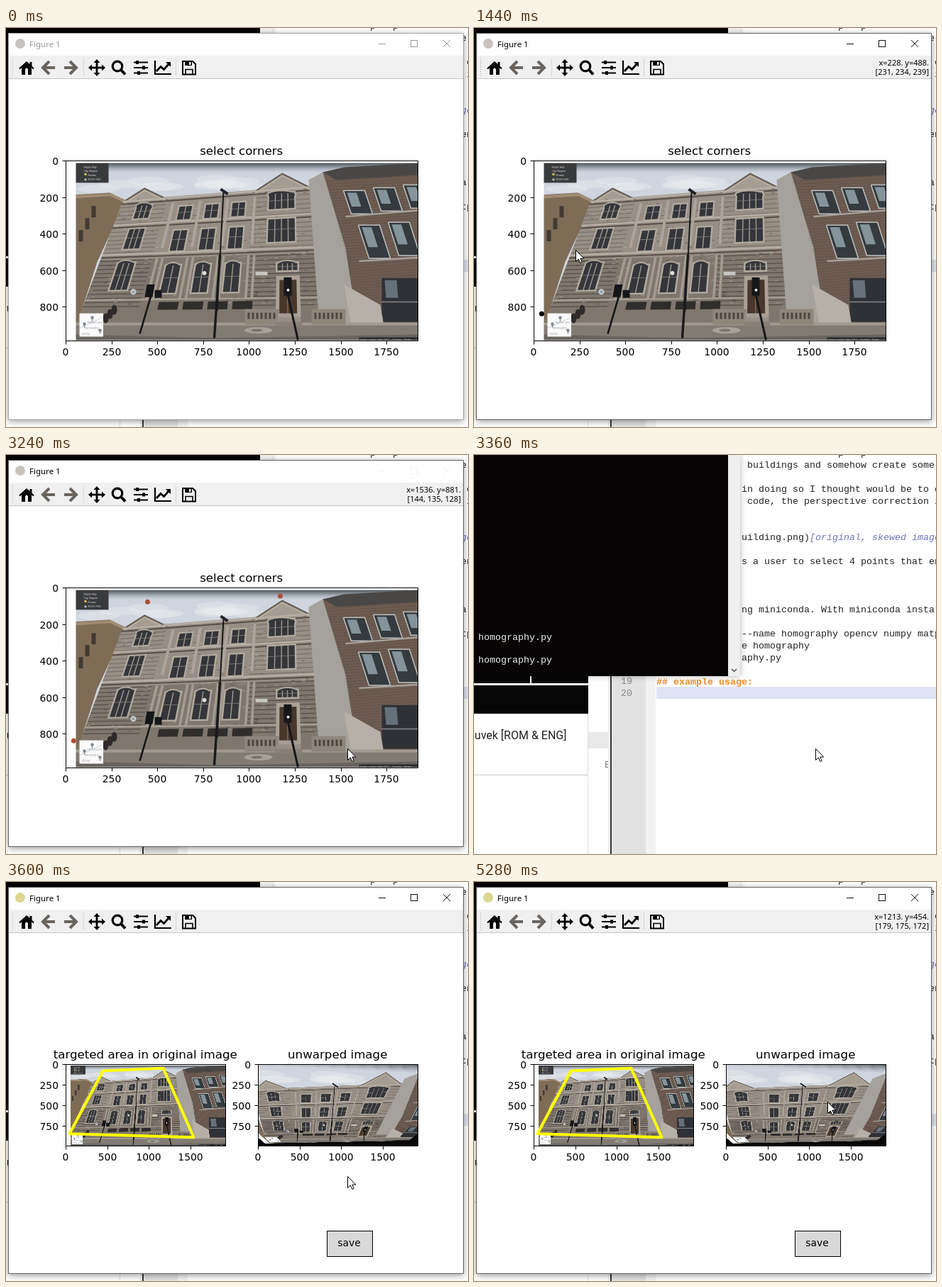
These frames come from a looping animation (651 by 563 pixels, 5.4 s). An HTML page with a canvas:

```html
<!DOCTYPE html>
<html lang="en">
<head>
<meta charset="utf-8">
<title>Perspective correction</title>
<style>
html, body { margin: 0; width: 100%; height: 100%; overflow: hidden; background: #fff; }
canvas { display: block; }
</style>
</head>
<body>
<canvas id="stage" width="651" height="563"></canvas>
<script>
const LOOP = 5400, STEP = 120;
const c = document.getElementById('stage').getContext('2d');
const PLOT = '"DejaVu Sans", sans-serif', UI = '"Noto Sans", sans-serif', MONO = '"Liberation Mono", monospace';
const IW = 1920, IH = 986;
const MAIN = { x: 84.5, y: 187.5, w: 496, h: 254 };
const LEFT = { x: 84.5, y: 257.5, w: 225, h: 115 };
const RIGHT = { ...LEFT, x: 355.5 };
const QUAD = [[445, 77], [1169, 45], [1536, 881], [42, 838]];
const at = (a, x, y) => [a.x + x / IW * a.w, a.y + y / IH * a.h];
const lerp = (a, b, f) => a + (b - a) * f;

// ---- helpers ----
function rect(col, x, y, w, h) { c.fillStyle = col; c.fillRect(x, y, w, h); }
function text(s, x, y, font, col = '#000', align = 'left') {
  c.font = font; c.fillStyle = col; c.textAlign = align; c.fillText(s, x, y);
}
function trace(pts, close) {
  c.beginPath();
  for (let i = 0; i < pts.length; i += 2) c.lineTo(pts[i], pts[i + 1]);
  if (close) c.closePath();
}
function line(col, w, ...pts) { trace(pts); c.strokeStyle = col; c.lineWidth = w; c.stroke(); }
function frameBox(x, y, w, h, col = '#000') { c.strokeStyle = col; c.lineWidth = 1; c.strokeRect(x, y, w, h); }
function disc(col, x, y, r) { c.beginPath(); c.arc(x, y, r, 0, 7); c.fillStyle = col; c.fill(); }
function ring(col, x, y, r, w) { c.beginPath(); c.arc(x, y, r, 0, 7); c.strokeStyle = col; c.lineWidth = w; c.stroke(); }

// Projective map taking the quad to its bounding box
function unwarp(q) {
  const [[x0, y0], [x1, y1], [x2, y2], [x3, y3]] = q;
  const sx = x0 - x1 + x2 - x3, sy = y0 - y1 + y2 - y3;
  const ax = x1 - x2, ay = y1 - y2, bx = x3 - x2, by = y3 - y2, den = ax * by - bx * ay;
  const g = (sx * by - sy * bx) / den, h = (ax * sy - ay * sx) / den;
  const a = x1 - x0 + g * x1, b = x3 - x0 + h * x3, d = y1 - y0 + g * y1, e = y3 - y0 + h * y3;
  const xs = q.map(p => p[0]), ys = q.map(p => p[1]);
  const l = Math.min(...xs), t = Math.min(...ys), r = Math.max(...xs), btm = Math.max(...ys);
  return (x, y) => {
    const k = (d * h - e * g) * x + (b * g - a * h) * y + a * e - b * d;
    const u = ((e - y0 * h) * x + (x0 * h - b) * y + b * y0 - x0 * e) / k;
    const v = ((y0 * g - d) * x + (a - x0 * g) * y + x0 * d - a * y0) / k;
    return [lerp(l, r, u), lerp(t, btm, v)];
  };
}

// Street view of flat shapes in stage coordinates; the facade uses its own u, v grid
function street(map, labels) {
  const cv = document.createElement('canvas');
  cv.width = 992; cv.height = 508;
  const g = cv.getContext('2d');
  const path = n => {
    g.beginPath();
    for (let i = 0; i < n.length; i += 2) {
      const [x, y] = map((n[i] - 84) / 496 * IW, (n[i + 1] - 187) / 255 * IH);
      g.lineTo(x * 992 / IW, y * 508 / IH);
    }
  };
  const poly = (col, ...n) => { path(n); g.fillStyle = col; g.fill(); };
  const seg = (col, w, ...n) => { path(n); g.strokeStyle = col; g.lineWidth = w * 2; g.stroke(); };
  const corners = (x, y, w, h, s = 0) => [x, y, x + w, y, x + w + s, y + h, x + s, y + h];
  const box = (col, ...b) => poly(col, ...corners(...b));
  const oval = (col, x, y, rx, ry = rx) => {
    const n = [];
    for (let a = 0; a < 6.28; a += .3) n.push(x + rx * Math.cos(a), y + ry * Math.sin(a));
    poly(col, ...n);
  };
  let seed = 7;
  const rnd = () => (seed = seed * 16807 % 2147483647) / 2147483647;

  g.fillStyle = '#080808'; g.fillRect(0, 0, 992, 508);
  path(corners(84, 187, 496, 255)); g.clip();
  box('#fff', 84, 187, 496, 255);

  // sky, darker at the top edge
  box('#cfd5de', 98, 190, 482, 251);
  for (let i = 0; i < 12; i++) oval('rgba(232,234,238,.4)', 130 + rnd() * 240, 212 + rnd() * 16, 30, 6);
  for (let i = 0; i < 14; i++) box(`rgba(60,70,74,${.8 * (1 - i / 14) ** 1.5})`, 98, 190 + i, 482, 1.1);

  // neighbour on the left
  poly('#7f6c56', 98, 235, 146, 232, 168, 243, 128, 330, 98, 424);
  seg('#a08c73', 4, 98, 238, 147, 235, 164, 243);
  for (let i = 0; i < 3; i++) box('#413a34', 102 + i * 9, 285 - i * 17, 6, 16);

  // facade
  const face = (u, v) => [lerp(164 - 66 * v, 430 + 11 * v, u), lerp(243 + 177 * v, 222 + 198 * v, u)];
  const quad = (u, v, w, h) => [...face(u, v), ...face(u + w, v), ...face(u + w, v + h), ...face(u, v + h)];
  const course = (col, w, v, u0 = 0, u1 = 1) => seg(col, w, ...face(u0, v), ...face(u1, v));
  const post = (col, w, u, v0, v1) => seg(col, w, ...face(u, v0), ...face(u, v1));
  const win = (u, v, w, h, cols, arch) => {
    poly('#b3aba0', ...quad(u - .008, v - .012, w + .016, h + .024));
    if (arch) oval('#b3aba0', ...face(u + w / 2, v + .01), w * 165, 7);
    poly('#34363a', ...quad(u, v, w, h));
    if (arch) oval('#34363a', ...face(u + w / 2, v + .01), w * 145, 5);
    for (let i = 1; i < cols; i++) post('#a29b92', 1.4, u + w * i / cols, v, v + h);
    course('#85817b', .8, v + h * .45, u, u + w);
  };
  const gable = (u0, u1, rise) => {
    const [x0, y0] = face(u0, .02), [x1, y1] = face(u1, .02), n = [x0, y0, (x0 + x1) / 2, (y0 + y1) / 2 - rise, x1, y1];
    poly('#a59d92', ...n); seg('#645b53', 2, ...n); seg('#c0b9ae', 1, ...n.map((q, i) => i % 2 ? q + 3 : q));
  };
  const TOWERS = [[0, .24], [.69, 1]];
  poly('#978f86', ...quad(0, 0, 1, 1));
  poly('#7f776e', ...quad(0, .48, 1, .52));
  for (const [a, b] of TOWERS) {
    gable(a, b, a ? 24 : 18);
    for (let v = .06; v < .86; v += .033) course(v > .47 ? 'rgba(45,39,34,.5)' : 'rgba(65,57,50,.35)', 1.2, v, a, b);
  }
  for (let i = 0; i < 260; i++) {
    const u = rnd(), v = rnd() * .86;
    course(i % 2 ? 'rgba(200,193,183,.5)' : 'rgba(50,44,39,.4)', 1, v, u, u + .015);
  }
  for (const v of [.01, .2, .44]) { course('#b8b0a5', 2.4, v); course('#544c45', 1.8, v + .022); }
  for (let i = 0; i < 4; i++) {
    const u = .264 + i * .142;
    post('#aca499', 4, u + .012, .05, .4);
    for (const d of [0, .026]) post('#a59c91', 3.5, u + d, .48, .8);
  }
  for (let r = 0; r < 3; r++) {
    const v = [.085, .27, .54][r], h = .1 + r * .055;
    win(.09, v - .03, .075, h, 3, r !== 1);
    for (let i = 0; i < 3; i++) win(.315 + i * .137, v, .065, h, 2, r === 2);
    if (r < 2) win(.777, v - .045, .13, h + .01, 4, !r);
  }
  course('#aaa297', 2, .8);
  for (let i = 0; i < 4; i++) poly('#302e2c', ...quad(.32 + i * .105, .82, .085, .06));
  win(.825, .55, .09, .05, 4, true);
  poly('#aba296', ...quad(.82, .64, .105, .3));
  poly('#49372c', ...quad(.835, .67, .075, .26));
  post('#856f5c', 1.2, .87, .67, .93);

  // pale wall, brick block with rows of glazing
  poly('#a5a19c', 426, 214, 446, 203, 478, 300, 492, 418, 441, 420);
  poly('#6d5c52', 446, 203, 580, 190, 580, 416, 494, 418, 478, 310);
  for (let y = 216; y < 410; y += 4) seg('rgba(40,32,28,.16)', 1, 450 + (y - 212) * .26, y, 580, y - 8);
  poly('#494745', 446, 203, 476, 196, 580, 190, 580, 207, 465, 214);
  for (let r = 0; r < 2; r++) {
    for (let i = 0; i < 3; i++) {
      const b = [475 + 21 * r + 42 * i, 229 + 49 * r - 4 * i, 30, 33 + 14 * r, 11 + 4 * r], [x, y, w, h, s] = b;
      box('#343a3d', ...b);
      box('#84949a', x + 5, y + 3, w * .45, h * .6, s * .6);
      seg('#bfc1c0', 1.5, ...corners(...b), x, y);
    }
    seg('#a6a19b', 2.5, 478 + r * 19, 266 + r * 63, 580, 257 + r * 67);
  }
  box('#2e3135', 529, 353, 51, 62);
  box('#66717a', 533, 356, 17, 25, 2);
  box('#888', 529, 386, 51, 1.5);
  poly('#b7b0a8', 476, 362, 527, 391, 532, 420, 486, 422);

  // pavement, balustrades, steps
  box('#817b74', 98, 416, 482, 25);
  box('#a19a91', 98, 416, 482, 4);
  poly('#68645f', 98, 433, 300, 438, 580, 433, 580, 441, 98, 441);
  for (const x of [336, 430]) {
    box('#8e867b', x, 397, 48, 22);
    for (let i = 0; i < 7; i++) box('#4c463f', x + 4 + i * 6, 402, 3, 9);
  }
  for (let i = 0; i < 3; i++) box(`rgb(${165 - i * 14},${157 - i * 14},${147 - i * 14})`, 383 - i * 2, 403 + i * 6, 30 + i * 4, 6);
  oval('#a6a19a', 355, 427, 20, 4.5); oval('#77726c', 353, 427, 8, 2);
  for (let i = 0; i < 3; i++) oval('#2f2b2a', 140 + i * 6, 410 - i * 6, 4, 7);

  // lamp post, signals, markers
  oval('#c9ccd0', 179, 372.5, 4); oval('#8fa0ae', 179, 372.5, 2); oval('#dedbd4', 279, 346, 3);
  box('#c6c5c0', 351, 344, 17, 5);
  seg('#1a1a1d', 2, 306, 231, 297, 400); seg('#1a1a1d', 3.4, 301, 320, 293, 438);
  seg('#222326', 4, 302, 227, 312, 234);
  seg('#151618', 2.6, 205, 374, 188, 432); seg('#151618', 3, 396, 374, 411, 441);
  box('#141517', 198, 362, 11, 18, -3); box('#17181a', 209, 370, 10, 11);
  box('#161719', 391, 352, 11, 26); oval('#e6e9ec', 397, 370, 2);

  // overlay panels
  box('#393a3c', 98, 190, 46, 28);
  box('#fafafa', 103, 403, 33.5, 33);
  seg('#d8dadd', 1.2, 103, 424, 136, 409);
  for (let i = 0; i < 3; i++) {
    const x = 110 + i * 11, y = 418 + (i % 2 ? -9 : i * 4.5);
    oval('#7c8790', x, y, 2.2); seg('#7c8790', 1.4, x, y, x, y + 5);
  }
  box('#2c2b2b', 497, 437, 83, 4);
  if (labels) {
    const put = (s, x, y, col = '#ccc') => { g.font = '7px ' + UI; g.fillStyle = col; g.fillText(s, (x - 84) * 2, (y - 187) * 2); };
    ['Maple Way', 'City, Region', '  Photos', '  Street view'].forEach((s, i) => put(s, 109 + (i > 1) * 4, 197 + i * 5.7, '#eee'));
    ['Market Lane', 'Old Reading', 'Library'].forEach((s, i) => put(s, 114 - i * 4, 416 + i * 8, '#889'));
    put('Image capture: May 2022    Country    Terms', 498, 440.5);
    oval('#d6b25e', 111.5, 206, 1.8); oval('#bbb', 111.5, 213.5, 1.6);
  }
  return cv;
}
const photo = street((x, y) => [x, y], true);
const flat = street(unwarp(QUAD), false);

// ---- desktop behind the figure window ----
const NOTES = {
  1: '                                p   p', 18: '                buildings and somehow create some',
  52: '               in doing so I thought would be to e', 69: '                code, the perspective correction is',
  120: '               uilding.png)', 154: '               s a user to select 4 points that enc',
  222: '               ng miniconda. With miniconda install', 256: '               --name homography opencv numpy matpl',
  273: '               e homography', 290: '               aphy.py'
};
function desktop() {
  rect('#fff', 0, 0, 651, 563);
  rect('#e9e9e9', 161, 391, 28, 23);
  rect('#c8c8c8', 0, 451, 161, 1);
  rect('#ddd', 160, 312, 1, 251);
  text('E', 184, 441, '12px ' + UI, '#777');
  rect('#eee', 189, 312, 6, 251); rect('#333', 192, 312, 2, 251);
  rect('#e2e2e2', 195, 312, 47, 251);
  rect('#f2f2f2', 242, 312, 14, 251);
  rect('#dfe3f3', 257, 327, 394, 17);
  const code = '13.33px ' + MONO;
  for (const y in NOTES) text(NOTES[y], 257, +y, code, '#222');
  text('[original, skewed image', 473, 120, 'italic ' + code, '#7272b8');
  text('19', 207, 323, code, '#888'); text('20', 207, 340, code, '#888');
  text('## example usage:', 257, 324, 'bold ' + code, '#f08a20');
  rect('#060606', 0, 312, 161, 53);
  rect('#fff', 0, 322, 161, 3); rect('#fff', 79, 312, 2, 11);
  c.save();
  c.shadowColor = 'rgba(0,0,0,.3)'; c.shadowBlur = 8;
  rect('#060404', 0, 0, 375, 312);
  c.restore();
  rect('#f0f0f0', 358, 0, 17, 312);
  line('#555', 1.5, 363, 302, 366.5, 305.5, 370, 302);
  for (const y of [261, 293]) text('homography.py', 6, y, code, '#eee');
  text('nuvek [ROM & ENG]', -8, 401, '16px Roboto, sans-serif', '#222');
}

// ---- figure window ----
function icon(x, draw, turn = 0) {
  c.save(); c.translate(x, 56); c.rotate(turn); draw(); c.restore();
}
function toolbar() {
  const k = '#000', grey = '#6a645f';
  rect('#f0f0f0', 4, 39, 640, 32); rect('#c4c4c4', 4, 71, 640, 1);
  for (let y = 43; y < 69; y += 3) rect('#aaa', 9, y, 1, 1);
  for (const x of [109, 239]) rect('#d4d4d4', x, 43, 1, 25);
  icon(29, () => {
    line(k, 2.2, -10, 1.5, 0, -7.5, 10, 1.5); rect(k, 4.5, -8, 3, 6);
    line(k, 5, -4.5, 10, -4.5, 1, 0, -3, 4.5, 1, 4.5, 10);
  });
  const arrow = () => { line(grey, 4, -9, 0, 7, 0); line(grey, 4, -1, -9, 8, 0, -1, 9); };
  icon(60, arrow, Math.PI); icon(91, arrow);
  for (let i = 0; i < 4; i++) icon(128, () => {
    line(k, 2.8, 0, 0, 8, 0);
    trace([12, 0, 7, -4.5, 7, 4.5], true); c.fillStyle = k; c.fill();
  }, i * Math.PI / 2);
  icon(158, () => { ring(k, -1, -2, 6.8, 3.2); line(k, 4, 4, 3, 10, 9.5); });
  icon(190, () => [-7, 2, -5].forEach((x, i) => {
    const y = (i - 1) * 7.5;
    line(k, 2, -10, y, 10, y); rect(k, x, y - 2.5, 4, 5);
  }));
  icon(221, () => {
    line(k, 2.2, -11, -10, -11, 9, 12, 9); line(k, 2.8, -9, 5, -3, -1.5, 1.5, 2.5, 9, -6);
    trace([4, -8, 11, -8, 11, -1], true); c.fillStyle = k; c.fill();
  });
  icon(258, () => {
    line(k, 2, -9, -9, 5, -9, 9, -5, 9, 9.5, -9, 9.5, -9, -10);
    rect(k, -6, -9, 10, 6); rect('#f0f0f0', 0, -8, 2.5, 4);
    line(k, 1.6, -5, 9, -5, 2.5, 5, 2.5, 5, 9);
  });
}
function frame(t, blank) {
  const idle = t < 720;
  c.save();
  c.shadowColor = 'rgba(0,0,0,.4)'; c.shadowBlur = 9; c.shadowOffsetY = 2;
  rect(idle ? '#aaa' : '#666', 3, 7, 642, 546);
  c.restore();
  rect('#fff', 4, 8, 640, 544);
  disc(t >= 3600 ? '#dcd690' : '#c8c3bd', 20, 22, 7);
  text('Figure 1', 33, 27, '11.5px ' + UI, idle ? '#999' : '#000');
  const b = idle ? '#999' : t >= 3120 && t < 3360 ? '#f2f2f2' : '#111';
  line(b, 1, 525, 22.5, 535, 22.5);
  frameBox(570.5, 17.5, 9, 9, b);
  line(b, 1, 616, 17, 626, 27); line(b, 1, 626, 17, 616, 27);
  if (!blank) toolbar();
}
function axes(a, img, title, xs, ys) {
  c.drawImage(img, a.x, a.y, a.w, a.h);
  frameBox(a.x, a.y, a.w, a.h);
  text(title, a.x + a.w / 2 - .8, a.y - 8.5, '16.67px ' + PLOT, '#000', 'center');
  const font = '13.89px ' + PLOT;
  for (let v = 0; v < IW; v += xs) {
    const x = Math.round(at(a, v, 0)[0] - .5) + .5, y = a.y + a.h;
    line('#000', 1, x, y, x, y + 5);
    text(v, x - .5, y + 20, font, '#000', 'center');
  }
  for (let v = 0; v < IH; v += ys) {
    const y = Math.round(at(a, 0, v)[1] - .5) + .5;
    line('#000', 1, a.x - 5, y, a.x, y);
    text(v, a.x - 10.5, y + 5, font, '#000', 'right');
  }
}

// ---- pointer: leave, arrive, place, colour under it ----
const [P2, P3, P4, P1] = QUAD.map(p => at(MAIN, ...p));
const WHITE = [255, 255, 255];
const LEGS = [
  [0, 0, [-25, 350], WHITE],
  [120, 690, P1, WHITE],
  [1260, 1640, P2, [203, 210, 220]],
  [1800, 2130, P3, [150, 158, 169]],
  [2450, 2980, P4, [144, 135, 128]],
  [3500, 4300, [480.5, 417], WHITE],
  [4400, 4850, at(RIGHT, 1213, 454), [179, 175, 172]]
];
const CLICKS = [[1080, P1], [1720, P2], [2300, P3]];
function pointer(t) {
  let i = LEGS.length - 1;
  while (i && t < LEGS[i][0]) i--;
  const [t0, t1, q, l] = LEGS[i], [, , p, k] = LEGS[Math.max(0, i - 1)];
  const f = Math.min(1, (t - t0) / (t1 - t0 || 1)), e = f * f * (3 - 2 * f);
  const mix = (a, b) => a.map((v, j) => lerp(v, b[j], e));
  return { p: mix(p, q), rgb: mix(k, l).map(Math.round) };
}
function cursor(x, y) {
  c.save(); c.translate(Math.round(x) + .5, Math.round(y) + .5);
  trace([0, 0, 0, 16, 3.8, 12.5, 6.3, 18, 8.7, 17, 6.4, 11.6, 11.3, 11.6], true);
  c.fillStyle = '#fff'; c.fill(); c.strokeStyle = '#000'; c.lineWidth = 1; c.stroke();
  c.restore();
}

function selection(t) {
  axes(MAIN, photo, 'select corners', 250, 200);
  for (const [ct, q] of CLICKS) if (t >= ct) disc(t < 2400 ? '#000' : '#ab503c', ...q, 3.5);
}
function result() {
  axes(LEFT, photo, 'targeted area in original image', 500, 250);
  axes(RIGHT, flat, 'unwarped image', 500, 250);
  c.lineJoin = 'round';
  trace(QUAD.flatMap(q => at(LEFT, ...q)), true);
  c.strokeStyle = '#ff0'; c.lineWidth = 4; c.stroke();
  c.lineJoin = 'miter';
  rect('#d9d9d9', 452, 492, 65, 37); frameBox(452.5, 492.5, 64, 36);
  text('save', 483.5, 514, '13.89px ' + PLOT, '#000', 'center');
}
function readout(list, x, y, rgb) {
  const a = list.find(a => x >= a.x && x <= a.x + a.w && y >= a.y && y <= a.y + a.h);
  if (!a) return;
  const dx = Math.round((x - a.x) / a.w * IW), dy = Math.round((y - a.y) / a.h * IH);
  text(`x=${dx}. y=${dy}.`, 641, 53, '11px ' + UI, '#000', 'right');
  text(`[${rgb.join(', ')}]`, 641, 66, '11px ' + UI, '#000', 'right');
}

function draw(t) {
  const { p: [x, y], rgb } = pointer(t);
  const second = t >= 3600;
  desktop();
  if (t >= 3480 && !second) {
    c.save();
    c.globalAlpha = .88;
    c.translate(324, 280); c.scale(.992, .992); c.translate(-324, -280);
    frame(t, true);
    c.restore();
  } else if (t < 3360 || second) {
    frame(t);
    if (second) result(); else selection(t);
    readout(second ? [LEFT, RIGHT] : [MAIN], x, y, rgb);
  }
  if (t >= 720 && t < 1080) {
    disc('#fff', x, y, 8);
    ring('#549fdb', x, y, 8, 4);
  } else cursor(x, y);
}

const start = performance.now();
(function tick() {
  draw(Math.floor((performance.now() - start) % LOOP / STEP) * STEP);
  requestAnimationFrame(tick);
})();
</script>
</body>
</html>
```
